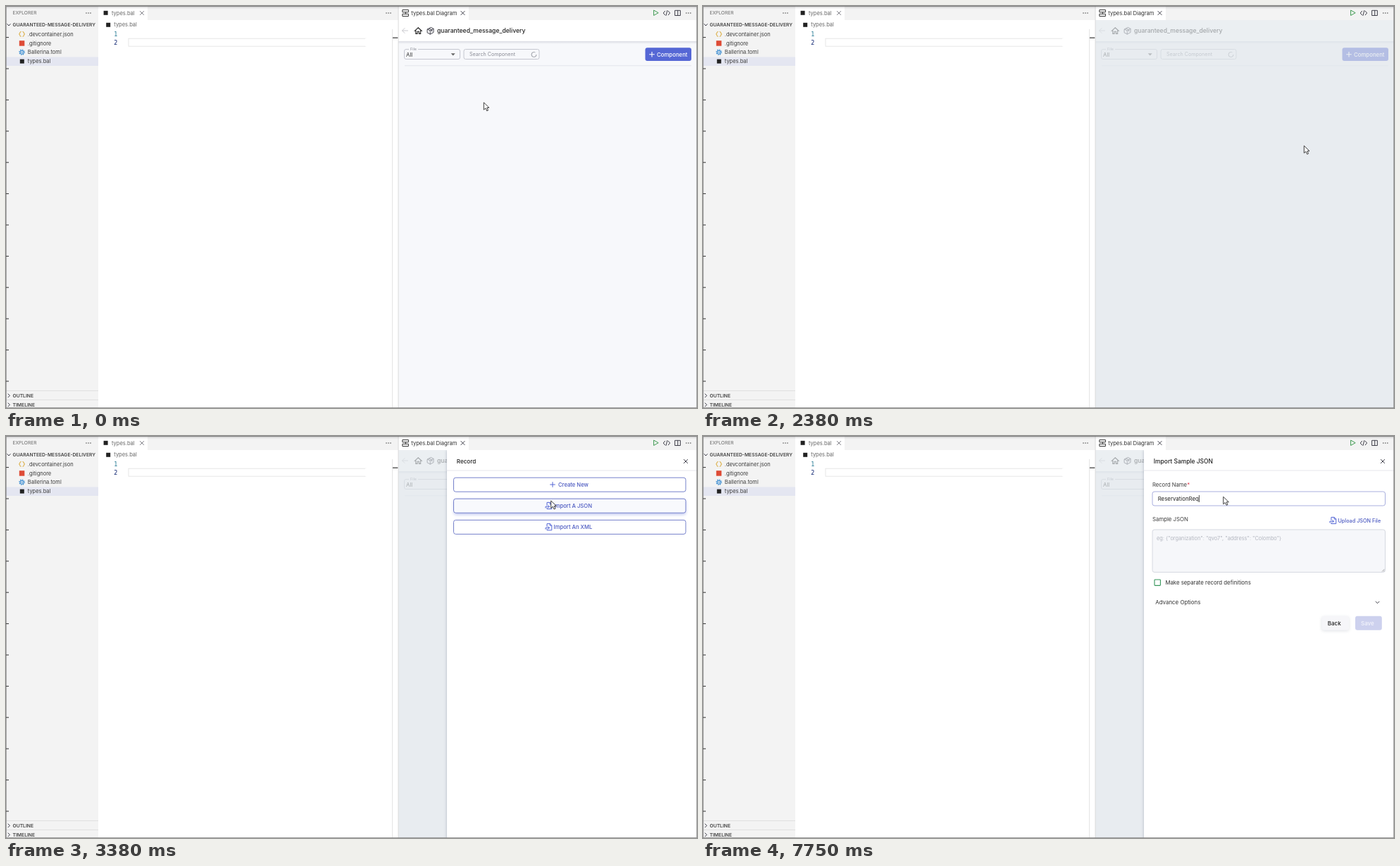
An HTML page that plays this animation: 981x571 px, repeating every 8 s.

```html
<!DOCTYPE html>
<html lang="en">
<head>
<meta charset="utf-8">
<title>Record import</title>
<style>
html, body { margin: 0; width: 100%; height: 100%; overflow: hidden; background: #fff; }
svg { display: block; width: 981px; height: 571px; }
text { font: 7.5px Inter, "Open Sans", sans-serif; fill: #3c3c3c; white-space: pre; }
.semi { font-weight: 600; }
.med { font-weight: 500; }
.mono { font: 8.3px "DejaVu Sans Mono", monospace; }
.fx { font: italic 600 12.5px "Noto Serif", "Liberation Serif", serif; text-anchor: middle; fill: #40404b; }
.icon { fill: none; stroke: #40404b; stroke-width: 1; stroke-linecap: round; stroke-linejoin: round; }
.blue { stroke: #5567d5; }
</style>
</head>
<body>
<svg viewBox="0 0 981 571">
  <defs>
    <filter id="soft" x="-20%" y="-20%" width="140%" height="140%"><feGaussianBlur stdDeviation="2.2"/></filter>
    <linearGradient id="topShade" x2="0" y2="1">
      <stop stop-opacity=".2"/><stop offset="1" stop-opacity="0"/>
    </linearGradient>
    <linearGradient id="headShade" x2="0" y2="1">
      <stop stop-color="#59607a" stop-opacity=".18"/><stop offset="1" stop-color="#59607a" stop-opacity="0"/>
    </linearGradient>
    <g id="close"><path class="icon" d="M-2.6-2.6L2.6 2.6M2.6-2.6L-2.6 2.6" stroke-width=".8"/></g>
    <g id="dots" fill="#424242"><circle cx="-3" r=".75"/><circle r=".75"/><circle cx="3" r=".75"/></g>
    <g id="import" class="icon blue" stroke-width=".9">
      <path d="M-2.4-.6V-4.6H1.8L4.4-2V4.6H-2.4V3M1.8-4.6V-2H4.4M-4.4 3V1.2H1M-.6-.5L1.1 1.2L-.6 2.9"/>
    </g>
  </defs>

  <g id="sidebar">
    <rect width="131" height="571" fill="#f3f3f3"/>
    <rect y="72.5" width="131" height="12.5" fill="#e4e6f1"/>
    <path d="M0 546.5H131M0 559.5H131" stroke="#dcdcdc" stroke-width=".8"/>
    <g class="icon" stroke="#555" stroke-width=".8">
      <path d="M1.8 25.6L4 28L6.2 25.6M3 551L5.4 553.4L3 555.8M3 564L5.4 566.4L3 568.8"/>
    </g>
    <use href="#dots" x="117" y="10"/>
    <path class="icon" style="stroke:#d9a62e" d="M21.2 36.5Q19.8 36.5 19.8 38T18.4 39.9Q19.8 40 19.8 41.8T21.2 43.3M23.9 36.5Q25.3 36.5 25.3 38T26.7 39.9Q25.3 40 25.3 41.8T23.9 43.3"/>
    <rect x="18.8" y="49.2" width="7.5" height="7.5" fill="#de4c36"/>
    <g fill="none" stroke="#3f8fd2">
      <circle cx="22.6" cy="65.7" r="2.5" stroke-width="1.1"/>
      <circle cx="22.6" cy="65.7" r="3.6" stroke-width="1.3" stroke-dasharray="1.41"/>
      <circle cx="22.6" cy="65.7" r=".8" stroke-width=".8"/>
    </g>
    <rect x="19.8" y="75.6" width="6" height="6" fill="#222"/>
  </g>

  <g id="editor">
    <rect x="131" width="426" height="571" fill="#fff"/>
    <rect x="201" width="356" height="20" fill="#f3f3f3"/>
    <rect x="138.6" y="6.8" width="6" height="6" fill="#222"/>
    <rect x="142.2" y="23.8" width="6" height="6" fill="#222"/>
    <use href="#close" x="193" y="10" opacity=".65"/>
    <use href="#dots" x="543" y="10"/>
    <rect x="174" y="46.2" width="337" height="11" fill="none" stroke="#e6e6e6"/>
    <path d="M511 46V57.5" stroke="#fff" stroke-width="2"/>
    <path d="M548.5 33V571" stroke="#e4e4e4"/>
    <path d="M549 45.2H556.5" stroke="#444" stroke-width="1.3"/>
  </g>

  <g id="diagram">
    <rect x="557" width="424" height="571" fill="#f7f8fb"/>
    <rect x="557" y="20" width="424" height="30" fill="#fff"/>
    <rect x="557" y="50" width="424" height="4" fill="url(#headShade)"/>
    <path class="icon" style="stroke:#c9c9ce" d="M570.5 35H562.5M566 31.5L562.5 35L566 38.5"/>
    <path d="M580.3 35.3L585.2 30.8L590.1 35.3H588.6V39.4H586.4V36.3H584V39.4H581.8V35.3Z" fill="none" stroke="#222" stroke-width="1.1"/>
    <path class="icon" stroke-width=".9" d="M598.4 33L603.2 30.4L607 32.4V37.5L602.2 40L598.4 38ZM598.4 33L602.2 35L607 32.4M602.2 35V40M600.5 31.9L604.6 33.8V36"/>
    <g fill="none" stroke="#c5c7d0">
      <rect x="565.5" y="61.5" width="79" height="14" rx="2.5"/>
      <rect x="650" y="61.5" width="107" height="14" rx="2.5"/>
      <circle cx="749.5" cy="69" r="3.5" stroke="#8e919b" stroke-width=".9" stroke-dasharray="18 4"/>
    </g>
    <rect x="572" y="60" width="13" height="3" fill="#f7f8fb"/>
    <path d="M631.7 67.2H637.7L634.7 70.4Z" fill="#666"/>
    <path d="M566 84.8H973" stroke="#e3e5ec"/>
    <rect id="addBtn" x="907.5" y="59.3" width="65.5" height="18.7" rx="3" fill="#5567d5"/>
    <path d="M913.2 68.8H920.8M917 65V72.6" stroke="#fff" stroke-width="1.1"/>
  </g>

  <rect id="shade" x="557" y="20" width="424" height="551" fill="rgb(226,231,236)" opacity="0"/>
  <g id="constructs"></g>
  <g id="record">
    <rect x="626" y="20" width="356" height="560" fill="#44506a" opacity=".35" filter="url(#soft)"/>
    <rect x="626" y="20" width="356" height="551" fill="#fff"/>
    <path d="M626 49H981" stroke="#e5e6ec"/>
    <use href="#close" x="965" y="36"/>
    <g id="choices"></g>
    <g id="form">
      <rect x="638" y="79" width="330.5" height="20" rx="3" fill="#fff" stroke="#a9afdf"/>
      <rect x="638" y="133" width="330.5" height="60.5" rx="3" fill="#f6f7fa" stroke="#d6d9e1"/>
      <path d="M964 192.5L967.5 189M966 192.5L967.5 191" stroke="#777" stroke-width=".6"/>
      <use href="#import" x="894.3" y="120"/>
      <rect x="641" y="204" width="8.4" height="8.4" rx=".8" fill="#fff" stroke="#36965b" stroke-width="1.1"/>
      <path class="icon" d="M955 235.2L957.5 237.7L960 235.2"/>
      <rect x="878.5" y="257" width="38.5" height="20" rx="3" fill="#8890a0" opacity=".25" filter="url(#soft)"/>
      <rect x="878.5" y="255.8" width="38.5" height="20" rx="3" fill="#f6f6f9"/>
      <rect x="926" y="255.8" width="37.8" height="20" rx="3" fill="#cdd1ee"/>
      <path id="caret" d="M0 84V94" stroke="#222" stroke-width=".8"/>
    </g>
  </g>

  <g id="tabs">
    <rect x="557" width="424" height="20" fill="#f3f3f3"/>
    <rect x="557" width="100" height="20" fill="#fff"/>
    <path class="icon" d="M563.2 5.5H571.4V8.7H563.2ZM563.2 11.3H571.4V14.5H563.2ZM567.3 8.7V11.3" style="stroke:#333"/>
    <use href="#close" x="648.5" y="10"/>
    <path class="icon" style="stroke:#3d9a50" stroke-width=".9" d="M919.6 6.4V13.4L925.8 9.9Z"/>
    <path class="icon" stroke-width=".9" d="M935.6 7.2L933.2 10L935.6 12.8M940.2 7.2L942.6 10L940.2 12.8M938.8 6.5L937 13.5M950 6.3H957.4V13.5H950ZM953.7 6.3V13.5"/>
    <use href="#dots" x="968.8" y="10"/>
  </g>

  <g id="frame">
    <path d="M557 0V571" stroke="#dadada"/>
    <rect width="981" height="4" fill="url(#topShade)"/>
    <path d="M0 .4H981" stroke="#666" stroke-width=".8"/>
    <path d="M.4 0V571M980.6 0V571M0 570.5H981" stroke="#8a8a8a" stroke-width=".8"/>
    <path id="ticks" stroke="#333"/>
  </g>
  <path id="cursor" d="M0 0V10.4L2.6 8.2L4.4 12L6.2 11.2L4.5 7.5H7.7Z" fill="#fff" stroke="#333" stroke-width=".95" stroke-linejoin="round"/>
</svg>
<script>
const $ = id => document.getElementById(id);
const add = (id, markup) => $(id).insertAdjacentHTML('beforeend', markup);
const esc = s => s.replace(/&/g, '&amp;').replace(/</g, '&lt;');
const text = (x, y, s, size = 7.5, fill = '#3c3c3c', cls = '') =>
  `<text x="${x}" y="${y}" class="${cls}" style="font-size:${size}px;fill:${fill}">${esc(s)}</text>`;
const icon = (d, extra = '') => `<path class="icon" d="${d}" ${extra}/>`;
const glyph = s => `<text class="fx" y="4">${s}</text>`;

add('sidebar',
  text(9.5, 12.4, 'EXPLORER', 6.65, '#6a6a6a') +
  text(9.5, 29.1, 'GUARANTEED-MESSAGE-DELIVERY', 6.7, '#444', 'semi') +
  ['.devcontainer.json', '.gitignore', 'Ballerina.toml', 'types.bal']
    .map((s, i) => text(30.8, 42.6 + i * 12.9, s)).join('') +
  text(9.5, 556, 'OUTLINE', 6.75, '#444', 'semi') +
  text(9.5, 569, 'TIMELINE', 6.75, '#444', 'semi'));
add('editor',
  text(150, 12.6, 'types.bal', 7.5, '#666') + text(153.3, 29.4, 'types.bal', 7.5, '#666') +
  text(153.3, 42.5, '1', 8.3, '#237893', 'mono') + text(153.3, 54.7, '2', 8.3, '#0b216f', 'mono'));
add('tabs', text(575.3, 12.7, 'types.bal Diagram', 7.6, '#333'));
add('diagram',
  text(612, 38, 'guaranteed_message_delivery', 8.6, '#222', 'med') +
  text(574, 63, 'File', 5.4, '#8a8c96') + text(568, 71.8, 'All', 7.8, '#333') +
  text(658, 71.2, 'Search Component', 7.15, '#8a8c96') +
  text(924, 71.7, 'Component', 7.8, '#fff', 'med'));

const person = icon('M-4.2 5.3V3.4Q-4 1.2-1.8 1.2H1.8Q4 1.2 4.2 3.4V5.3Z') +
  '<circle class="icon" cy="-2.2" r="2.9"/>';
const gear = '<g fill="none" stroke="#33333c"><circle r="3.3" stroke-width="2.6"/>' +
  '<circle r="5" stroke-width="1.8" stroke-dasharray="2.2 1.727"/></g>';
const groups = [
  [65, 'Entry points', [['Main', glyph('fx')], ['Service', gear], ['Trigger', person]]],
  [172, 'Constructs', [
    ['Record', glyph('(x)')], ['Function', glyph('fx')], ['Listener', person], ['Enum', glyph('(e)')],
    ['Class', icon('M-5.4-5.4H5.4V5.4H-5.4Z')],
    ['Data Mapper', icon('M-5.5-4.5H-3V-2.5H-5.5ZM-5.5 2.5H-3V4.5H-5.5ZM3-4.5H5.5V-2.5H3ZM3 2.5H5.5V4.5H3ZM-3-3.5H3M-3 3.5H3M-5.5 0H-2M2 0H5.5M0-3.5V3.5')]]],
  [350, 'Module level variables', [
    ['Connector', icon('M4-3.6A5.3 5.3 0 1 0 4 3.6M2-1.8A2.5 2.5 0 1 0 2 1.8M-.2 0H-5M2-1.8H5.5M2 1.8H5.5')],
    ['Variable', icon('M0-5.8L5.1-2.9V2.9L0 5.8L-5.1 2.9V-2.9ZM-2.3-1.3L0 0L2.3-1.3M0 0V2.6')],
    ['Configurable', icon('M-5.6-3.7Q-5.6-5.3-3.4-5.3T-1.2-3.7V3.7Q-1.2 5.3-3.4 5.3T-5.6 3.7ZM1.2-3.7Q1.2-5.3 3.4-5.3T5.6-3.7V3.7Q5.6 5.3 3.4 5.3T1.2 3.7ZM-3.4-2.5V0M3.4 0V2.5')],
    ['Constant', icon('M0-5.3L5.8 5H-5.8Z')],
    ['Other', icon('M1-4.6H-5V5.2H4.8V0M-1.6 1.8L-1 -.8L4-5.6L5.8-3.8L.8 1.2Z', 'stroke-width="1.2"')]]]
];
// Drawer drawn with its left edge at zero
add('constructs',
  `<rect y="20" width="190" height="560" fill="#44506a" opacity=".35" filter="url(#soft)"/>
   <rect y="20" width="190" height="551" fill="#fff"/>
   <path d="M0 49H190M0 153.7H190M0 332H190" stroke="#e2e3e9"/>
   <use href="#close" x="168" y="36"/>` +
  icon('M21 35.5H13.5M16.8 32.2L13.5 35.5L16.8 38.8') +
  text(34, 38.4, 'Add Constructs', 8.3, '#222', 'semi') +
  groups.map(([y, title, items]) =>
    text(12.7, y + 2.7, title, 7.4, '#222', 'semi') +
    items.map(([name, art], i) => {
      const row = y + 23.8 + i * 23.65;
      return `<g transform="translate(21.5 ${row})">${art}</g>` + text(38.7, row + 2.8, name, 7.5, '#333');
    }).join('')).join(''));

const buttons = [[59, 'Create New'], [89, 'Import A JSON'], [119.2, 'Import An XML']];
add('choices', buttons.map(([y, s], i) =>
  `<rect class="glow" x="636" y="${y + 1.5}" width="329" height="21" rx="3" fill="#5567d5" opacity=".4" filter="url(#soft)"/>
   <rect class="btn" x="635.5" y="${y + .2}" width="329.5" height="20" rx="3" stroke="#6f7bc9" stroke-width=".95"/>` +
  (i ? `<use href="#import" x="770.4" y="${y + 10}"/>` : icon('M772.6 69H779.4M776 65.6V72.4', 'style="stroke:#5567d5"')) +
  text(i ? 777.6 : 784, y + 13, s, 7.65, '#4a58c0', 'med')).join(''));
$('record').insertAdjacentHTML('beforeend', '<text id="title" x="639.8" y="38.6" class="med"></text>');
add('form',
  text(638, 71.7, 'Record Name', 7.65) + text(687.2, 71.7, '*', 7.65, '#e0344b') +
  '<text id="typed" x="645.7" y="91.7" style="font-size:7.85px;fill:#222"></text>' +
  text(638, 121.2, 'Sample JSON', 7.8) +
  text(901.5, 122.7, 'Upload JSON File', 7.25, '#4a58c0', 'med') +
  text(644, 148, 'eg: {"organization": "qvo7", "address": "Colombo"}', 7.35, '#b4b7c0') +
  text(656.4, 211, 'Make separate record definitions', 7.8, '#333') +
  text(642.3, 239, 'Advance Options', 7.9, '#333') +
  text(886.8, 268.6, 'Back', 8, '#222', 'med') + text(934, 268.6, 'Save', 8, '#f4f5fc', 'med'));
$('ticks').setAttribute('d', Array.from({ length: 12 }, (_, i) => `M0 ${44.6 + i * 44.4}H4`).join(''));

// All times below are in ticks of 125 ms
const moves = [
  [2, 8, 678.3, 137, 922, 64],
  [11, 16, 922, 64, 853.3, 198.5],
  [20, 26, 853.3, 198.5, 773.7, 92],
  [29, 31, 773.7, 92, 738.7, 86.3]
];
const word = 'ReservationReq';
const typing = [[39, 1], [40, 2], [41, 3], [43, 4], [44, 5], [46, 6], [49, 7], [52, 8], [53, 10], [54, 11], [58, 12], [59, 13], [62, 14]];
const ease = p => p * p * (3 - 2 * p);

function cursorAt(k) {
  const [a, b, x0, y0, x1, y1] = moves.filter(m => m[0] <= k).pop() || moves[0];
  const p = ease(Math.min(1, Math.max(0, (k - a) / (b - a))));
  return [x0 + (x1 - x0) * p, y0 + (y1 - y0) * p];
}
function tickAt(ms) {
  const k = Math.floor(ms / 125);
  return Math.ceil(k * 12.5) * 10 > ms ? k - 1 : k;
}
const show = (el, on) => { el.style.display = on ? '' : 'none'; };
const glows = document.querySelectorAll('.glow'), btns = document.querySelectorAll('.btn');

function draw(k) {
  const [cx, cy] = cursorAt(k);
  $('cursor').setAttribute('transform', `translate(${cx} ${cy})`);
  $('shade').setAttribute('opacity', k < 9 ? 0 : k < 19 ? .45 : .68);
  $('addBtn').setAttribute('fill', k < 9 && cx > 907 && cy > 59 && cy < 78 ? '#4958bd' : '#5567d5');

  show($('constructs'), k >= 11 && k < 19);
  $('constructs').setAttribute('transform', `translate(${k < 12 ? 880 : 797} 0)`);

  const form = k >= 28;
  show($('record'), k >= 20);
  $('record').setAttribute('transform', `translate(${k < 21 ? 128.5 : 0} 0)`);
  show($('choices'), !form);
  show($('form'), form);
  $('title').textContent = form ? 'Import Sample JSON' : 'Record';
  $('title').style.cssText = `font-size:${form ? 8.45 : 8.1}px;fill:#222`;
  buttons.forEach(([y], i) => {
    const hot = cy >= y && cy <= y + 20.5;
    show(glows[i], hot);
    btns[i].setAttribute('fill', hot ? '#f8f9fd' : '#fff');
  });

  const step = typing.filter(s => s[0] <= k).pop();
  const typed = $('typed');
  typed.textContent = word.slice(0, step ? step[1] : 0);
  show($('caret'), k < 33 || k >= 37);
  const width = form && step ? typed.getComputedTextLength() : 0;
  $('caret').setAttribute('transform', `translate(${646.2 + width} 0)`);
}

const start = performance.now();
let last = -1;
function loop() {
  const k = tickAt((performance.now() - start) % 8000);
  if (k !== last) draw(last = k);
  requestAnimationFrame(loop);
}
loop();
</script>
</body>
</html>
```
